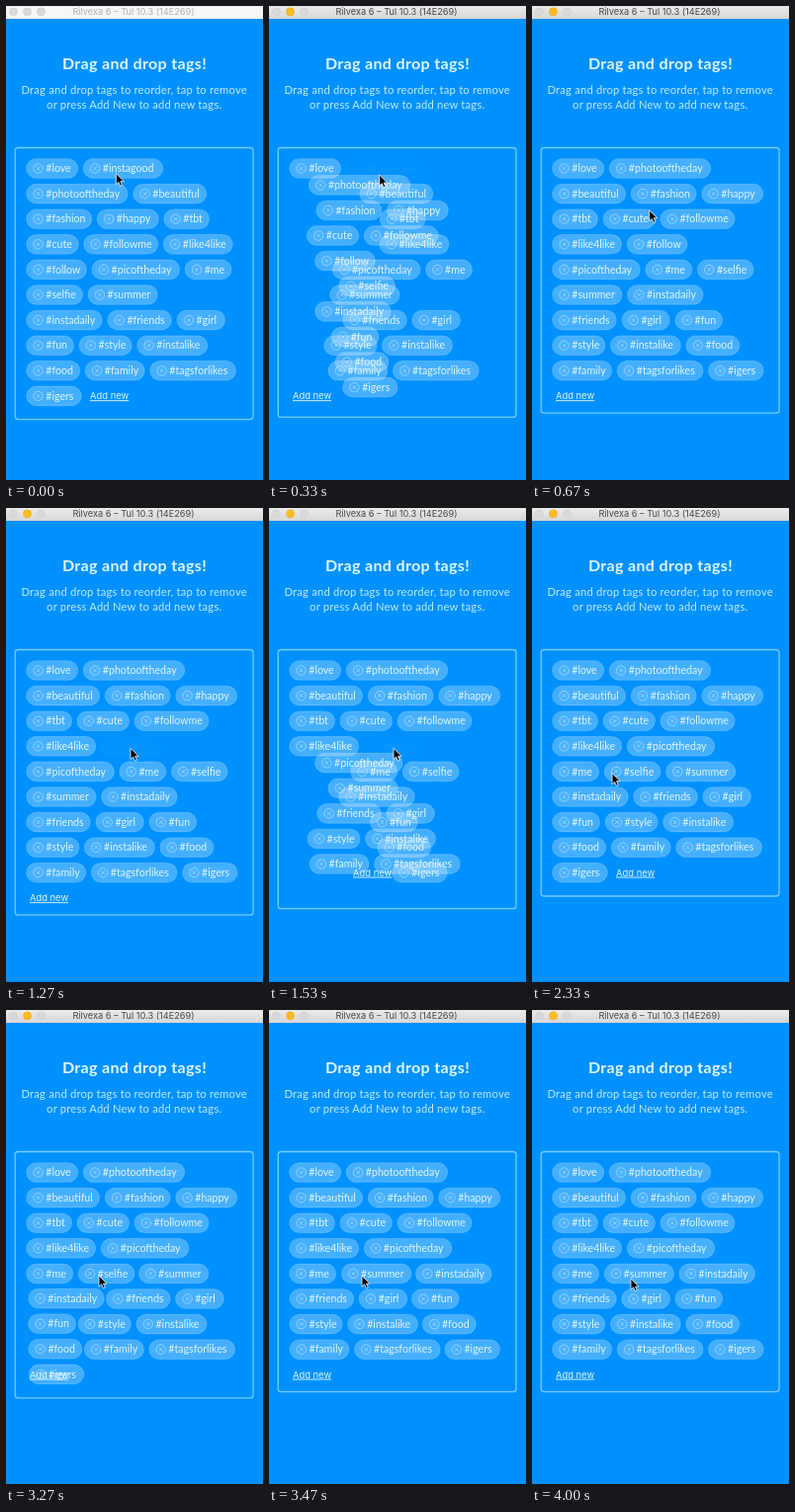
Animation, 260 px wide and 480 px high, one loop 4070 ms. Source, as an HTML page:

```html
<!DOCTYPE html>
<html lang="en">
<head>
<meta charset="utf-8">
<title>Drag and drop tags</title>
<style>
  html, body { margin: 0; width: 100%; height: 100%; overflow: hidden; background: #0091ff; }
  svg { display: block; width: 260px; height: 480px; }
  text { font-family: Lato, sans-serif; fill: #e2f7ff; }
  .mid { text-anchor: middle; }
  .bar text { font: 9.2px Inter, sans-serif; fill: #444; }
  .bar.off text { fill: #b0b0b0; }
  .bar rect { fill: url(#chrome); }
  .bar.off rect { fill: #f6f6f6; }
  .bar circle { fill: #d9d9d9; stroke: #c6c6c6; stroke-width: .5; }
  .bar .min { fill: #fdbc1f; stroke: #e0a010; }
  .bar.off .min { fill: #d9d9d9; stroke: #c6c6c6; }
  .head { font-size: 16px; font-weight: 700; letter-spacing: .35px; }
  .info { font-size: 11.2px; letter-spacing: .21px; fill: #c4ecff; }
  .box { fill: none; stroke: #74ccfc; stroke-width: 1.3; }
  .tag rect { fill: #fff; fill-opacity: .27; stroke: #fff; stroke-opacity: .24; stroke-width: .8; }
  .tag path { fill: none; stroke: #e2f7ff; stroke-opacity: .7; stroke-width: .7; }
  .tag text { font-size: 10.6px; }
  .add { font: 9.4px Inter, sans-serif; text-decoration: underline; }
</style>
</head>
<body>
<svg viewBox="0 0 260 480">
  <defs>
    <linearGradient id="chrome" x2="0" y2="1">
      <stop stop-color="#ececec"/><stop offset="1" stop-color="#d6d6d6"/>
    </linearGradient>
  </defs>
  <rect width="260" height="480" fill="#0091ff"/>
  <g class="bar" id="bar">
    <rect width="260" height="13"/>
    <circle cx="7.5" cy="5.8" r="4"/>
    <circle cx="21.5" cy="5.8" r="4" class="min"/>
    <circle cx="35.5" cy="5.8" r="4"/>
    <text class="mid" x="129" y="9">Rilvexa 6 – Tul 10.3 (14E269)</text>
  </g>
  <text class="head mid" x="130" y="64">Drag and drop tags!</text>
  <text class="info mid" x="129.7" y="88.5">Drag and drop tags to reorder, tap to remove</text>
  <text class="info mid" x="129.7" y="103.8">or press Add New to add new tags.</text>
  <rect class="box" id="box" x="9.2" y="143.5" width="240.8" height="275" rx="3"/>
  <g id="tags"></g>
  <text class="add" id="add">Add new</text>
  <path id="cursor" d="M0 0V11.2L2.6 8.8L4.4 12.8L6.3 12L4.6 8.1H8Z"
        fill="#000" stroke="#fff" stroke-width=".8" stroke-linejoin="round"/>
</svg>
<script>
const LOOP = 4070, FPS = 15, REFLOW = 225;
const LEFT = 20.7, RIGHT = 234.8, GAP = 5.5, TOP = 164.5, PITCH = 25.6;
const SPEC = `love 52, instagood 80.5, photooftheday 102.5, beautiful 74, fashion 66, happy 62, tbt 45.8,
  cute 52.5, followme 75, like4like 70, follow 60.8, picoftheday 88.6, me 47, selfie 56.8, summer 70.3,
  instadaily 76.6, friends 64.6, girl 48.6, fun 47.8, style 53.2, instalike 71, food 54, family 60,
  tagsforlikes 86.8, igers 55.6`;

// Each tap: tag, start of press (if visible) and moment of removal
const TAPS = [
  { name: 'instagood', press: 25, at: 245 },
  { name: 'follow', press: 1150, at: 1445 },
  { name: 'selfie', press: null, at: 3250 }
];
// Cursor moves: start, end, target x, target y
const MOVES = [
  [270, 1060, 126, 243.3],
  [1700, 2290, 81, 268.5],
  [2430, 2960, 94, 269],
  [3500, 4000, 100, 272]
];

const $ = id => document.getElementById(id);
const clamp = v => Math.max(0, Math.min(1, v));
const mix = (a, b, p) => a + (b - a) * p;
const ease = v => { v = clamp(v); return v * v * (3 - 2 * v); };
const place = (el, x, y) => el.setAttribute('transform', `translate(${x.toFixed(2)} ${y.toFixed(2)})`);

const tags = SPEC.split(',').map(item => {
  const [name, w] = item.trim().split(' ');
  return { name, w: +w };
});

for (const tag of tags) {
  const g = document.createElementNS('http://www.w3.org/2000/svg', 'g');
  g.setAttribute('class', 'tag');
  g.innerHTML = `<rect y="-9.8" width="${tag.w}" height="19.6" rx="9.8"/>
    <path d="M7.2 0a4.7 4.7 0 1 0 9.4 0a4.7 4.7 0 1 0-9.4 0M10 -1.9l3.8 3.8m0-3.8l-3.8 3.8"/>
    <text x="19.6" y="3.6">#${tag.name}</text>`;
  $('tags').append(g);
  tag.el = g;
}

function layout(list) {
  const pos = {};
  let x = LEFT, y = TOP;
  const put = w => {
    if (x + w > RIGHT) { x = LEFT; y += PITCH; }
    const spot = { x, y };
    x += w + GAP;
    return spot;
  };
  for (const tag of list) pos[tag.name] = put(tag.w);
  const add = put(45);
  return { pos, add, bottom: add.y + (add.x === LEFT ? 17.3 : 23.7) };
}

const gone = new Set();
const layouts = [layout(tags)];
for (const tap of TAPS) {
  gone.add(tap.name);
  layouts.push(layout(tags.filter(tag => !gone.has(tag.name))));
}

function opacity(name, t) {
  const tap = TAPS.find(tap => tap.name === name);
  if (!tap) return 1;
  const pressed = tap.press === null ? 1 : mix(1, .06, ease((t - tap.press) / 105));
  return pressed * (1 - ease((t - tap.at) / REFLOW));
}

function draw(t) {
  const step = TAPS.filter(tap => t >= tap.at).length;
  const to = layouts[step], from = layouts[Math.max(0, step - 1)];
  const p = step ? ease((t - TAPS[step - 1].at) / REFLOW) : 1;

  for (const { name, el } of tags) {
    const a = from.pos[name], b = to.pos[name] || a;
    if (a) place(el, mix(a.x, b.x, p), mix(a.y, b.y, p));
    el.setAttribute('opacity', a ? opacity(name, t) : 0);
  }
  place($('add'), to.add.x + 3.3, to.add.y + 3.3);
  $('box').setAttribute('height', mix(from.bottom, to.bottom, p) - 143.5);
  $('bar').classList.toggle('off', t < 60);

  let x = 111.3, y = 169.5;
  for (const [start, end, tx, ty] of MOVES) {
    const q = ease((t - start) / (end - start));
    x = mix(x, tx, q);
    y = mix(y, ty, q);
  }
  place($('cursor'), x, y);
}

const begin = performance.now();
function tick() {
  const t = (performance.now() - begin) % LOOP;
  draw(Math.floor((t + 4) * FPS / 1000) * 1000 / FPS);
  requestAnimationFrame(tick);
}
draw(0);
requestAnimationFrame(tick);
</script>
</body>
</html>
```
